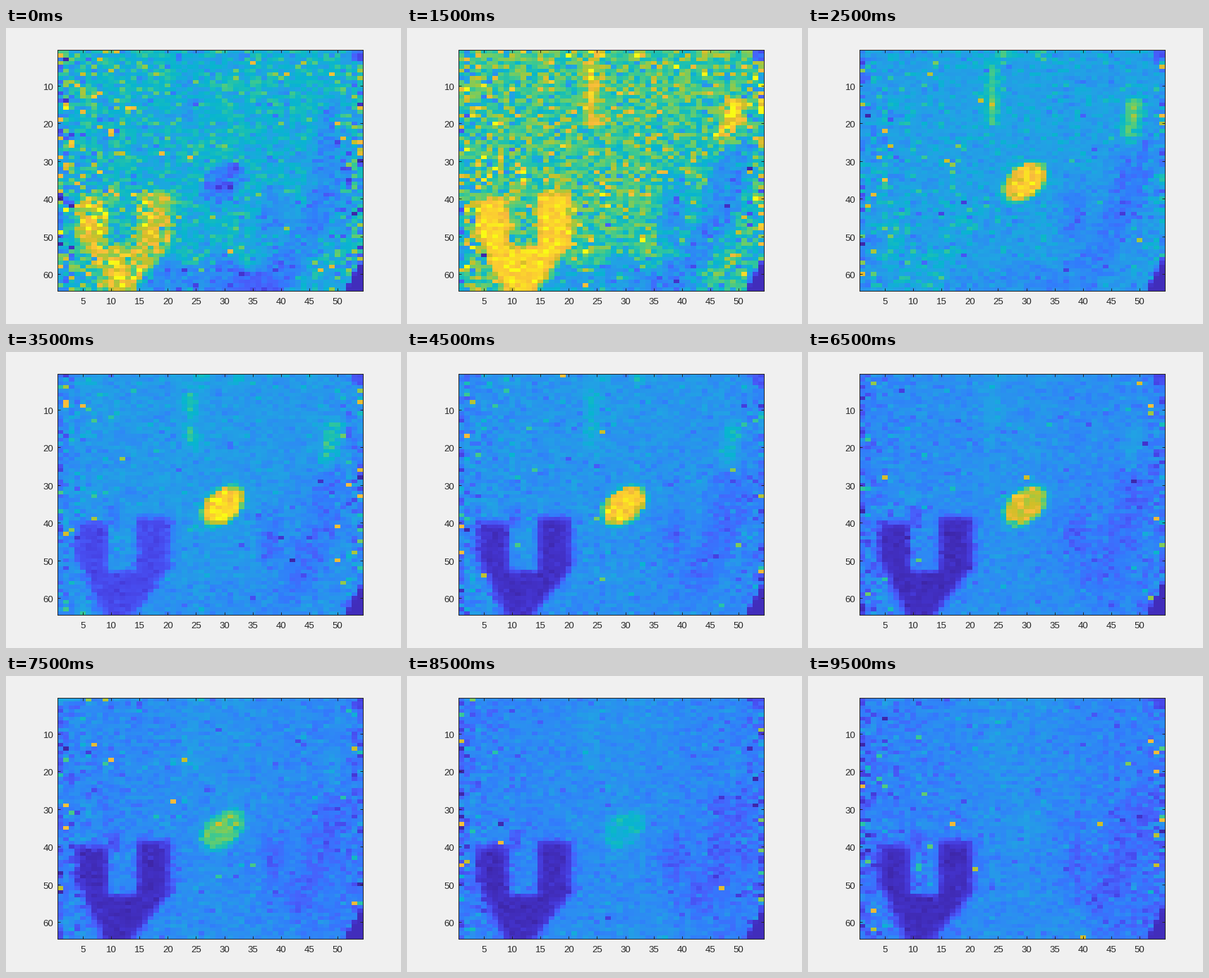
Write a matplotlib script that moves like this. It is 560 by 420 pixels and loops after 10000 ms.

```python
import numpy as np
import matplotlib.pyplot as plt
from matplotlib.animation import FuncAnimation
from matplotlib.colors import LinearSegmentedColormap
from matplotlib.transforms import ScaledTranslation

W, H, DPI = 560, 420, 100
ROWS, COLS, FRAMES, INTERVAL = 64, 54, 20, 500
X, Y = np.meshgrid(np.arange(1, COLS + 1), np.arange(1, ROWS + 1))

PARULA = LinearSegmentedColormap.from_list("parula", [
    "#3e26a8", "#4537d5", "#484df0", "#4763fd", "#327cfc", "#2d8cf3",
    "#259be8", "#20a5e3", "#08b5d0", "#19bfb6", "#37c897", "#64cd6f",
    "#9dc943", "#d1bf27", "#f8ba3d", "#fcd030", "#f9fb15"])


def rise(v, centre, width):
    return 1 / (1 + np.exp((centre - v) / width))


def fade(v, centre, width):
    return 1 - rise(v, centre, width)


def span(v, lo, hi, soft=.35):
    """Soft window that is 1 between lo and hi."""
    return rise(v, lo, soft) * fade(v, hi, soft)


def box(x0, x1, y0, y1, soft=.35):
    return span(X, x0, x1, soft) * span(Y, y0, y1, soft)


def bump(v, centre, width):
    return np.exp(-((v - centre) / width) ** 2)


def make_cup():
    left = 3.6 + 4.8 * np.clip((Y - 49) / 15, 0, 1)
    right = 20.7 - 6.5 * np.clip((Y - 52) / 12, 0, 1)
    top = np.where(X < 12, 39.7, 38.3)
    gap = box(9.5, 14.5, 0, 52.7, .3)
    body = span(X, left, right, .45) * rise(Y, top, .5) * (1 - gap)
    return np.maximum(body, .6 * box(9.6, 11.4, 35.6, 41.5))


def make_blob():
    dx, dy = (X - 29.8) * 8, (Y - 35.5) * 5.36
    u, v = .77 * dx - .64 * dy, .64 * dx + .77 * dy
    return fade(np.hypot(u / 35, v / 23), .98, .08)


def make_side():
    middle = 49.5 - 10 * ((Y - 25) / 36) ** 2
    arc = span(X, middle - 3.5, middle + 3, .8) * span(Y, 25, 63, 2)
    return np.maximum(arc, bump(X, 38.5, 2.5) * bump(Y, 44, 8))


def make_floor():
    surface = 57 + 2 * np.cos(2 * np.pi * (X - 34.5) / 11)
    depth = .6 + .4 * bump(X, 35, 5)
    return depth * span(X, 16, 43, .8) * rise(Y, surface, .8)


LEFT_EDGE = np.exp(-(X - 1) / 5)
RIGHT_EDGE = np.exp(-(COLS - X) / 2)
EDGE = np.maximum(LEFT_EDGE, RIGHT_EDGE)
SHADE = X / COLS * Y / ROWS
CENTRE = bump(X, 29, 11)
CUP = make_cup()
BLOB = make_blob()
SIDE = make_side()
FLOOR = make_floor()
FLAKE = span(X, 46.5 + (26 - Y) / 9, 50.6 - (Y - 14) / 14) * span(Y, 13.5, 26.5, .6)
BAR = box(22.7, 25.4, 3, 20.4) * (.7 + .3 * (X == 24) + .015 * (Y - 12))
PATCH = np.maximum(box(24.6, 27.5, 0, 2.5), box(31.5, 33.4, 0, 3.5))
CORNER = rise(X - COLS + .38 * (Y - ROWS), -2.75, .12)
TOP_CORNER = .8 * box(52.5, 55, 0, 3.4, .2)


def band_image(i):
    rng = np.random.default_rng(40 + i)
    flash = bump(i, 2.6, 1.5)
    decay = np.exp(-i / 9)
    early = np.exp(-i / 3)
    shown = rise(i, 2, .5)
    glint = shown * np.exp(-(i - 3) / 7) - .4 * (1 - shown)

    z = .28 + .21 * decay + .22 * flash - .04 * SHADE
    z = z + .07 * (i / FRAMES) ** 2 * (CENTRE - .4)
    z = z - .09 * np.exp(-(X - 1) / 1.2) - .04 * RIGHT_EDGE
    z = z + glint * (.45 * FLAKE + .33 * BAR + .28 * PATCH)
    for mask, level in (
            (SIDE, .18 + .11 * decay + .05 * flash),
            (FLOOR, .33 - .15 * early),
            (BLOB, .22 + .74 * rise(i, 2.7, .8) * fade(i, 16, 2)),
            (CUP, .03 + .78 * fade(i, 5.1, .9) + .22 * flash)):
        z = z + mask * (level - z)

    # Grain is stronger near the sides and in the first bands.
    calm = np.maximum(SIDE, FLOOR)
    sigma = .035 + (.03 * early + .05 * flash) * (1 - .6 * calm)
    sigma = sigma + (.045 + .07 * early) * EDGE
    grain = .01 + .09 * fade(i, 5.5, .5) * (1 - .8 * flash)
    sigma = sigma + CUP * (grain - sigma)
    z = z + sigma * rng.standard_t(7, z.shape)

    chance = (.035 + .13 * early) * (EDGE + .03) * (1 - CUP)
    hits = rng.random(z.shape) < chance
    z = np.where(hits, rng.uniform(.5, .9, z.shape), z)

    z = z + CORNER * (.03 - z)
    z = z + TOP_CORNER * (.08 - z)
    return np.clip(z, 0, 1)


plt.rcParams["font.family"] = "Liberation Sans"
INK = "#262626"
px = 72 / DPI
fig = plt.figure(figsize=(W / DPI, H / DPI), dpi=DPI, facecolor="#f0f0f0")
ax = fig.add_axes([73 / W, 1 - 373 / H, 433 / W, 342 / H])
image = ax.imshow(band_image(0), cmap=PARULA, vmin=0, vmax=1, aspect="auto",
                  interpolation="nearest", extent=(.5, COLS + .5, ROWS + .5, .5))
ax.set_xticks(range(5, 51, 5))
ax.set_yticks(range(10, 61, 10))
ax.tick_params(direction="in", length=4.3 * px, width=px, top=True, right=True,
               color=INK, labelcolor=INK, labelsize=13.3 * px)
ax.tick_params(axis="x", pad=10.5 * px)
ax.tick_params(axis="y", pad=5.5 * px)
lower = ScaledTranslation(0, -1.5 / DPI, fig.dpi_scale_trans)
for label in ax.get_yticklabels():
    label.set_transform(label.get_transform() + lower)
for spine in ax.spines.values():
    spine.set(color=INK, linewidth=px)


def update(i):
    image.set_data(band_image(i))
    return (image,)


anim = FuncAnimation(fig, update, frames=FRAMES, interval=INTERVAL,
                     repeat=True, repeat_delay=0, blit=False)
plt.show()
```
